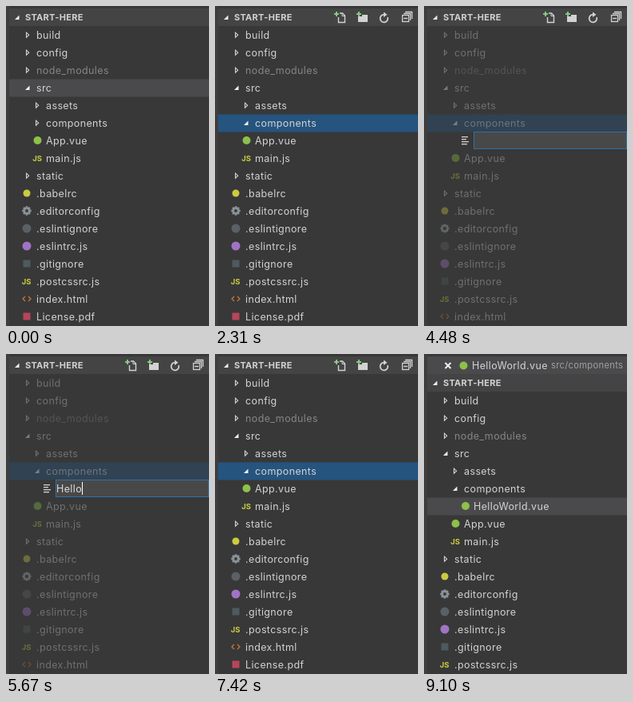
An HTML page with a canvas for the animation above (9.17 s loop, 254 px wide and 400 px high).

```html
<!DOCTYPE html>
<html lang="en">
<head>
<meta charset="utf-8">
<title>File explorer</title>
<style>
html, body { margin: 0; width: 100%; height: 100%; overflow: hidden; background: #383838; }
canvas { display: block; }
</style>
</head>
<body>
<canvas id="stage" width="254" height="400"></canvas>
<script>
const ctx = document.getElementById('stage').getContext('2d');
const LOOP = 9170, ROW = 22, W = 254, EDGE = 4;
const FONT = 'Inter, "Open Sans", sans-serif';
const FILE = 'HelloWorld.vue';

// Moments of the story, in ms
const T = {
  enter: 70, pick: 350, create: 2380, commit: 7350,
  listed: 7490, opened: 7630, leave: 8260
};
const KEYS = [5040, 5180, 5320, 5460, 5600, 5880, 6020, 6160, 6300, 6440, 6580, 6790, 7000, 7140];
const CARET_START = 2720, BLINK = 495;

const C = {
  bg: '#383838', edge: '#3e3e3e', head: '#444444', idle: '#4a4a4d', focus: '#25547f',
  text: '#d2d2d2', muted: '#858585', white: '#f0f0f0',
  green: '#8dc149', yellow: '#cbcb41', purple: '#a074c4',
  grey: '#5b6064', slate: '#4d5a5e', orange: '#d0763c', red: '#b8455a', gear: '#8b9296'
};

// [name, depth, kind]
const TREE = [
  ['build', 0, 'closed'], ['config', 0, 'closed'], ['node_modules', 0, 'closed'],
  ['src', 0, 'open'], ['assets', 1, 'closed'], ['components', 1, 'closed'],
  ['App.vue', 1, 'vue'], ['main.js', 1, 'js'], ['static', 0, 'closed'],
  ['.babelrc', 0, 'babel'], ['.editorconfig', 0, 'gear'], ['.eslintignore', 0, 'lintGrey'],
  ['.eslintrc.js', 0, 'lint'], ['.gitignore', 0, 'git'], ['.postcssrc.js', 0, 'js'],
  ['index.html', 0, 'html'], ['License.pdf', 0, 'pdf']
];

function text(str, x, y, size = 12.5, color = C.text, weight = 400, spacing = 0.38) {
  ctx.font = `${weight} ${size}px ${FONT}`;
  ctx.letterSpacing = spacing + 'px';
  ctx.fillStyle = color;
  ctx.fillText(str, x, y + 1);
}

function rect(x, y, w, h, color) {
  ctx.fillStyle = color;
  ctx.fillRect(x, y, w, h);
}

function line(points, color, width = 1, close = false) {
  ctx.beginPath();
  points.forEach(([x, y]) => ctx.lineTo(x, y));
  if (close) ctx.closePath();
  ctx.strokeStyle = color;
  ctx.lineWidth = width;
  ctx.stroke();
}

function disc(x, y, r, color) {
  ctx.beginPath();
  ctx.arc(x, y, r, 0, 7);
  ctx.fillStyle = color;
  ctx.fill();
}

function twisty(x, y, open) {
  if (!open) return line([[x - 1.5, y - 2.8], [x + 1.7, y + 0.2], [x - 1.5, y + 3.2]], C.text, 1.1, true);
  ctx.beginPath();
  ctx.moveTo(x + 2.5, y - 2.5);
  ctx.lineTo(x + 2.5, y + 3);
  ctx.lineTo(x - 3, y + 3);
  ctx.fillStyle = C.white;
  ctx.fill();
}

function gear(x, y) {
  for (let i = 0; i < 8; i++) {
    const a = i * Math.PI / 4, c = Math.cos(a), s = Math.sin(a);
    line([[x + c * 3, y + s * 3], [x + c * 5.7, y + s * 5.7]], C.gear, 2.6);
  }
  ctx.beginPath();
  ctx.arc(x, y, 3.3, 0, 7);
  ctx.lineWidth = 2.8;
  ctx.stroke();
}

const icons = {
  vue: (x, y) => disc(x, y, 5, C.green),
  js: (x, y) => text('JS', x - 6.3, y, 9.5, C.yellow, 700, 0),
  babel: (x, y) => disc(x, y, 4.5, C.yellow),
  gear,
  lintGrey: (x, y) => disc(x, y, 5.5, C.grey),
  lint: (x, y) => disc(x, y, 5.5, C.purple),
  git: (x, y) => rect(x - 4.5, y - 4.5, 9, 9, C.slate),
  html: (x, y) => {
    line([[x - 2, y - 3], [x - 5, y], [x - 2, y + 3]], C.orange, 1.2);
    line([[x + 2, y - 3], [x + 5, y], [x + 2, y + 3]], C.orange, 1.2);
  },
  pdf: (x, y) => rect(x - 4.5, y - 4.5, 9, 9, C.red),
  blank: (x, y) => [8, 6, 9, 7].forEach((w, i) => rect(x - 5, y - 5 + i * 3, w, 1.3, C.text))
};

function entry([name, depth, kind], y) {
  const x = 26 + depth * 12 + (depth > 1 ? 2 : 0);
  if (kind === 'open' || kind === 'closed') twisty(x + 1, y, kind === 'open');
  else icons[kind](x + (depth === 1 ? 1.5 : 0), y);
  text(name, depth > 1 ? 62 : 38 + depth * 12, y, 12.5, name === 'node_modules' ? C.muted : C.text);
}

function plus(x, y) {
  line([[x - 3, y], [x + 3, y]], '#89d185', 1.8);
  line([[x, y - 3], [x, y + 3]], '#89d185', 1.8);
}

function toolbar(y) {
  // New file
  line([[154.5, y], [154.5, y + 6.5], [162.5, y + 6.5], [162.5, y - 2], [159.5, y - 5], [156, y - 5]], C.text, 1.4);
  line([[159, y - 4.5], [159, y - 1.5], [162, y - 1.5]], C.text);
  plus(152, y - 4);
  // New folder
  rect(179, y - 1, 12, 7, C.text);
  rect(184, y - 3, 7, 2, C.text);
  plus(180, y - 4);
  // Refresh
  ctx.beginPath();
  ctx.arc(211.5, y + 1.5, 4.8, -0.3, 4.6);
  ctx.strokeStyle = C.text;
  ctx.lineWidth = 1.7;
  ctx.stroke();
  ctx.beginPath();
  ctx.moveTo(211, y - 6.5);
  ctx.lineTo(215.5, y - 3.2);
  ctx.lineTo(211, y);
  ctx.fillStyle = C.text;
  ctx.fill();
  // Collapse all
  line([[238, y - 6.5], [246.5, y - 6.5], [246.5, y + 2]], C.text, 1.3);
  line([[236, y - 4.5], [244.5, y - 4.5], [244.5, y + 4]], C.text, 1.3);
  ctx.strokeRect(234.5, y - 2.5, 8, 8);
  line([[236, y + 1.5], [241, y + 1.5]], C.text, 1.4);
}

function openEditor() {
  rect(0, 3, W, ROW, C.idle);
  line([[26.5, 11], [33.5, 18]], C.white, 2);
  line([[33.5, 11], [26.5, 18]], C.white, 2);
  icons.vue(49.5, 14.5);
  text(FILE, 60, 14);
  text('src/components', 159, 14, 11.2, '#a0a0a0', 400, 0.3);
}

function caretShown(t) {
  if (t >= KEYS[0]) return true;
  return t < CARET_START || Math.floor((t - CARET_START) / BLINK) % 2 === 0;
}

function nameInput(t, y) {
  icons.blank(52, y);
  rect(62, y - 11, W - 62, ROW, '#484848');
  ctx.strokeStyle = '#2f72a8';
  ctx.lineWidth = 1;
  ctx.strokeRect(62.5, y - 10.5, W - 63, ROW - 1);
  const typed = FILE.slice(0, KEYS.filter(k => t >= k).length);
  text(typed, 63, y, 12.5, '#dcdcdc');
  const x = 63 + (typed ? ctx.measureText(typed).width : 0);
  if (caretShown(t)) rect(Math.round(x), y - 8, 1, 16, '#ffffff');
}

function rowsAt(t) {
  const rows = TREE.map(r => [...r]);
  if (t >= T.pick) rows[5][2] = 'open';
  if (t >= T.create && t < T.commit) rows.splice(6, 0, ['', 2, 'input']);
  if (t >= T.listed) rows.splice(6, 0, [FILE, 2, 'vue']);
  return rows;
}

function selectionAt(t) {
  if (t < T.pick) return ['src', C.idle];
  return t < T.listed ? ['components', C.focus] : [FILE, C.idle];
}

function draw(t) {
  rect(0, 0, W, 400, C.bg);
  ctx.textBaseline = 'middle';
  const opened = t >= T.opened;
  const editing = t >= T.create && t < T.commit;
  const top = opened ? 14 + ROW : 14;
  const [picked, tint] = selectionAt(t);

  if (opened) openEditor();
  rect(0, top - 11, W, ROW, C.head);
  twisty(14, top, true);
  text('START-HERE', 24, top, 11, C.text, 700, 0.3);
  if (t >= T.enter && t < T.leave) toolbar(top);

  rowsAt(t).forEach((row, i) => {
    const y = top + (i + 1) * ROW;
    if (row[2] === 'input') return nameInput(t, y);
    ctx.globalAlpha = editing ? 0.36 : 1;
    if (row[0] === picked) rect(0, y - 10.5, W, ROW, tint);
    entry(row, y);
    ctx.globalAlpha = 1;
  });
  rect(0, 0, EDGE, 400, C.edge);
}

function tick(now) {
  draw(now % LOOP);
  requestAnimationFrame(tick);
}
draw(0);
requestAnimationFrame(tick);
</script>
</body>
</html>
```
